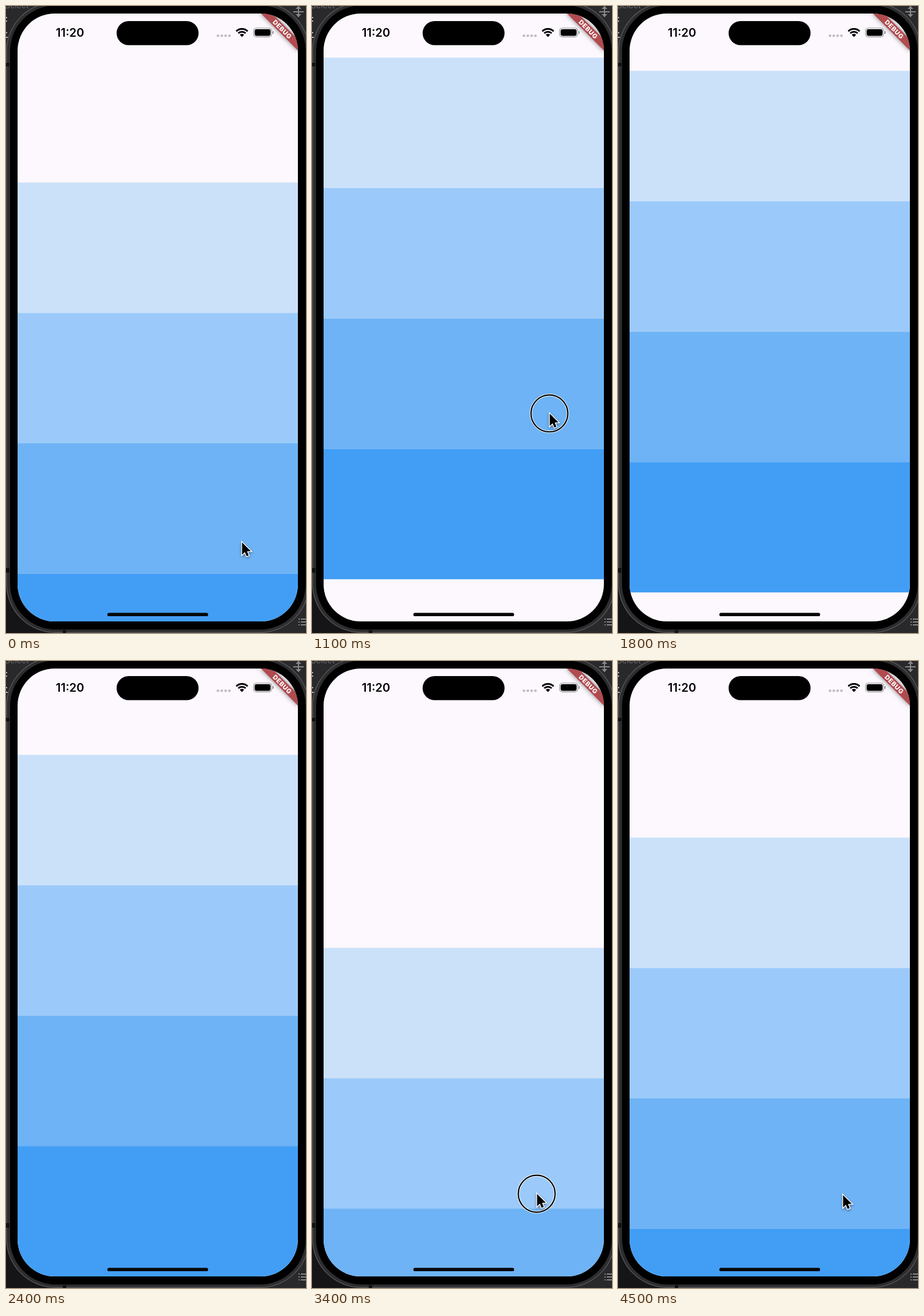
These frames come from a looping animation (518 px wide and 1081 px high, 4700 ms). An HTML page with a canvas:

```html
<!DOCTYPE html>
<html lang="en">
<head>
<meta charset="utf-8">
<title>Overscroll</title>
<style>
html, body { margin: 0; width: 100%; height: 100%; overflow: hidden; background: #151417; }
canvas { display: block; width: 518px; height: 1081px; }
</style>
</head>
<body>
<canvas id="stage" width="518" height="1081"></canvas>
<script>
const ctx = document.getElementById('stage').getContext('2d');
const LOOP = 4700, STEP = 100;
const SCREEN = { x: 20, y: 13, w: 484, h: 1048, r: 64 };
const REST = 304.4, END = 162, BAND = 224.8;
const BANDS = ['#cbe1f9', '#9bcafa', '#6eb3f5', '#429ef5'];
const FONT = 'Inter, Roboto, "Liberation Sans", sans-serif';

const clamp = (v, a, b) => Math.min(b, Math.max(a, v));
const lerp = (a, b, u) => a + (b - a) * u;
const progress = (t, a, b) => clamp((t - a) / (b - a), 0, 1);
const smooth = u => u * u * (3 - 2 * u);

function box(x, y, w, h, r, fill) {
  ctx.beginPath();
  ctx.roundRect(x, y, w, h, r);
  if (fill) { ctx.fillStyle = fill; ctx.fill(); }
}

function poly(points) {
  ctx.beginPath();
  points.forEach(([x, y]) => ctx.lineTo(x, y));
  ctx.closePath();
}

// Rubber band: the further past the edge, the less the content follows.
function rubber(pull, friction) {
  const k = friction * Math.max(0, pull) / SCREEN.h;
  return SCREEN.h * k / (1 + k);
}

// Overdamped spring released at rest, from 1 to 0.
function spring(ms) {
  const s = Math.max(0, ms) / 1000, slow = 9.08, fast = 22.04;
  return (fast * Math.exp(-slow * s) - slow * Math.exp(-fast * s)) / (fast - slow);
}

function pointer(t) {
  if (t < 800) {
    const u = smooth(progress(t, 0, 300));
    return { x: lerp(407, 409, u), y: lerp(924, 1015, u), shown: true };
  }
  if (t < 2600) {
    const u = smooth(progress(t, 800, 1425));
    return { x: lerp(409, 411, u), y: lerp(1015, 349, u), shown: t < 1500, down: t < 1500 };
  }
  const u = smooth(progress(t, 2715, 3400));
  const after = progress(t, 3500, 3700);
  return { x: lerp(446, 388, u), y: lerp(350, 918, u) + 2 * after, shown: true, down: t < 3600 };
}

function contentTop(t, y) {
  if (t < 800) return REST;
  if (t < 2600) {
    const drag = Math.max(0, 995 - y), room = REST - END;
    const over = rubber(drag - room, 0.52);
    return REST - Math.min(drag, room) - over + over * (1 - spring(t - 1587));
  }
  const top = END + Math.max(0, y - 370);
  if (top <= REST) return top;
  const over = rubber(Math.min(y, 918) - 512, 0.572);
  return REST + over * spring(t - 3550);
}

function drawDesk() {
  ctx.fillStyle = '#151417';
  ctx.fillRect(0, 0, 518, 1081);
  ctx.fillStyle = '#29282b';
  ctx.fillRect(0, 0, 518, 100);
  ctx.fillRect(430, 980, 88, 101);
  ctx.fillStyle = '#6b6a6d';
  ctx.font = '14px ' + FONT;
  ctx.textAlign = 'left';
  ctx.fillText('Select', -2, 4);
  ctx.fillStyle = '#b9b8ba';
  ctx.fillRect(0, 19, 2, 2);
  ctx.fillRect(0, 25, 2, 2);
  ctx.fillRect(0, 45, 2, 2);
  ctx.fillRect(0, 53, 3, 2);
}

function drawBody() {
  box(1, -6, 522, 1086, 84, '#2d2d2f');
  ctx.lineWidth = 1.3;
  ctx.strokeStyle = '#5a5a5d';
  ctx.stroke();
  box(7, -1, 510.5, 1076, 79, '#000');
  ctx.fillStyle = '#111113';
  ctx.fillRect(0, 98, 6, 6);
  ctx.fillRect(0, 969, 6, 8);
  ctx.fillRect(98, 1076, 6, 5);
}

function drawDeskIcons() {
  ctx.fillStyle = '#88878a';
  ctx.fillRect(496, 9, 18, 2);
  ctx.fillRect(504, 0, 2, 19);
  poly([[500, 5], [510, 5], [505, 0]]); ctx.fill();
  poly([[500, 14], [510, 14], [505, 19]]); ctx.fill();
  for (let i = 0; i < 3; i++) {
    ctx.fillRect(505, 1056 + i * 5, 2, 2);
    ctx.fillRect(509, 1056 + i * 5, 9, 2);
  }
}

function drawStatus() {
  ctx.fillStyle = '#000';
  ctx.font = '600 20px ' + FONT;
  ctx.textAlign = 'center';
  ctx.fillText('11:20', 110.5, 53.3);
  box(191, 26, 141.5, 41.5, 20.75, '#000');

  ctx.fillStyle = 'rgba(0,0,0,.24)';
  for (let i = 0; i < 4; i++) {
    ctx.beginPath();
    ctx.arc(366 + i * 6.6, 51.3, 2.3, 0, 7);
    ctx.fill();
  }

  const a = -Math.PI * 0.75, b = -Math.PI * 0.25;
  ctx.strokeStyle = ctx.fillStyle = '#000';
  ctx.lineWidth = 3;
  [13.8, 9].forEach(r => {
    ctx.beginPath();
    ctx.arc(407.4, 53.4, r, a, b);
    ctx.stroke();
  });
  ctx.beginPath();
  ctx.moveTo(407.4, 53.4);
  ctx.arc(407.4, 53.4, 5.4, a, b);
  ctx.fill();

  box(427.4, 38, 31.4, 15.4, 5);
  ctx.lineWidth = 1.1;
  ctx.strokeStyle = 'rgba(0,0,0,.42)';
  ctx.stroke();
  box(429.3, 39.9, 27.6, 11.6, 3.4, '#000');
  box(460.3, 43.2, 1.7, 5, 1, 'rgba(0,0,0,.45)');
}

function drawBanner() {
  ctx.save();
  ctx.translate(504, 13);
  ctx.rotate(Math.PI / 4);
  ctx.save();
  ctx.shadowColor = 'rgba(0,0,0,.5)';
  ctx.shadowBlur = 8;
  ctx.fillStyle = '#b14b4f';
  ctx.fillRect(-46, 31.5, 92, 13.5);
  ctx.restore();
  ctx.fillStyle = '#fff';
  ctx.font = '800 11px ' + FONT;
  ctx.textAlign = 'center';
  ctx.letterSpacing = '0.6px';
  ctx.fillText('DEBUG', 0.3, 42.3);
  ctx.restore();
}

function drawScreen(top) {
  const { x, y, w, h, r } = SCREEN;
  ctx.save();
  box(x, y, w, h, r, '#fcf8fe');
  ctx.clip();
  BANDS.forEach((color, i) => {
    ctx.fillStyle = color;
    ctx.fillRect(x, top + i * BAND, w, BAND);
  });
  drawStatus();
  drawBanner();
  box(175, 1046.3, 174, 5.8, 2.9, '#07070a');
  ctx.restore();
}

function drawPointer({ x, y, shown, down }) {
  if (!shown) return;
  if (down) {
    ctx.beginPath();
    ctx.arc(x, y + 0.5, 31.8, 0, 7);
    ctx.lineWidth = 4.2;
    ctx.strokeStyle = 'rgba(255,255,255,.9)';
    ctx.stroke();
    ctx.lineWidth = 2.2;
    ctx.strokeStyle = '#000';
    ctx.stroke();
  }
  ctx.save();
  ctx.translate(x + 0.6, y + 0.8);
  ctx.scale(1.25, 1.25);
  poly([[0, 0], [0, 17], [3.9, 13.4], [6.4, 19.2], [9.2, 18], [6.8, 12.3], [12, 12]]);
  ctx.lineJoin = 'miter';
  ctx.lineWidth = 2.2;
  ctx.strokeStyle = '#fff';
  ctx.shadowColor = 'rgba(0,0,0,.4)';
  ctx.shadowBlur = 4;
  ctx.shadowOffsetY = 2;
  ctx.stroke();
  ctx.shadowColor = 'transparent';
  ctx.fillStyle = '#000';
  ctx.fill();
  ctx.restore();
}

function draw(t) {
  const p = pointer(t);
  drawDesk();
  drawBody();
  drawDeskIcons();
  drawScreen(contentTop(t, p.y));
  drawPointer(p);
}

const start = performance.now();
function tick() {
  const t = (performance.now() - start) % LOOP;
  draw(Math.floor(t / STEP) * STEP);
  requestAnimationFrame(tick);
}
tick();
</script>
</body>
</html>
```
